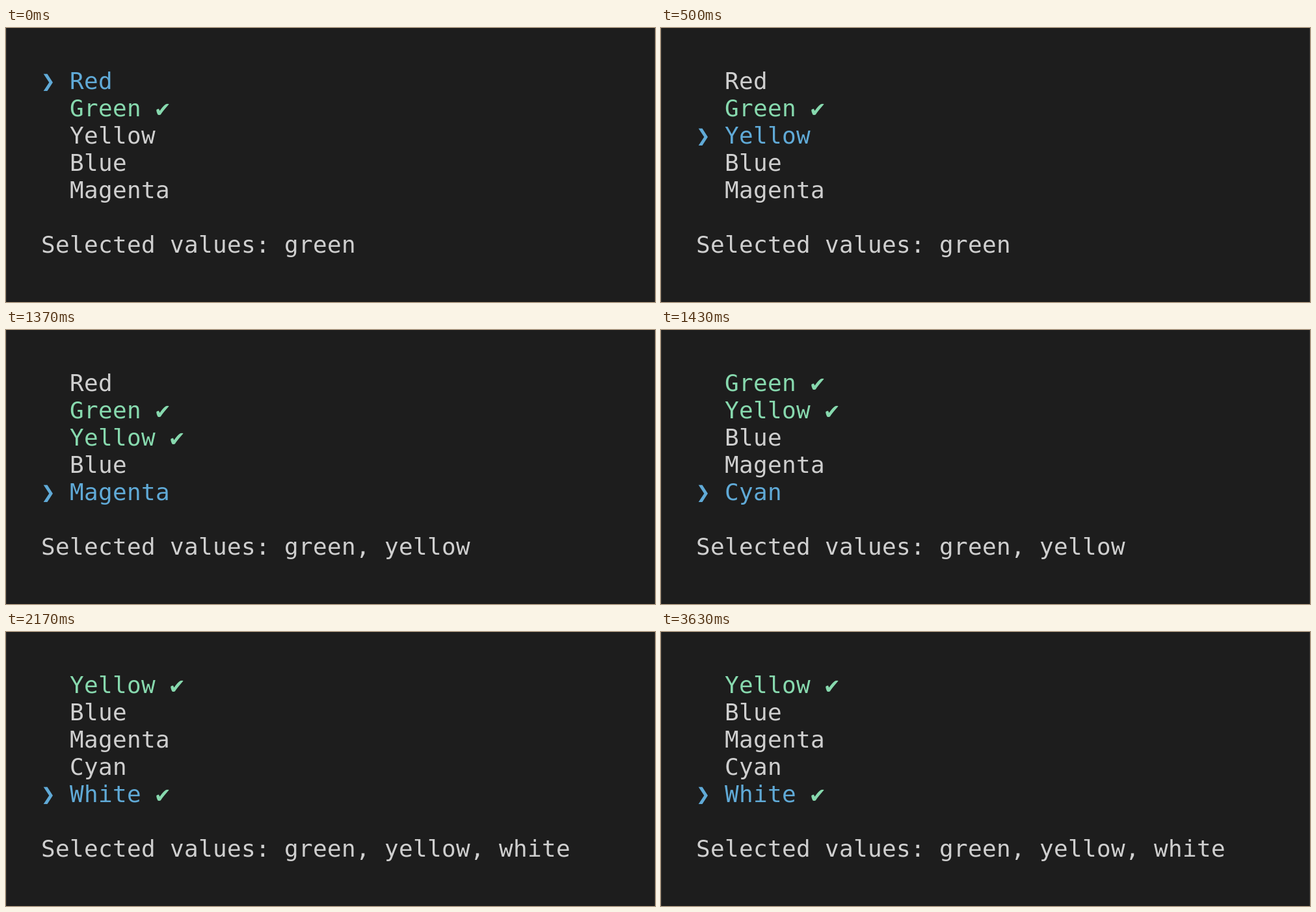
These frames come from a looping animation (998 by 422 pixels, 3.92 s). An HTML page:

```html
<!DOCTYPE html>
<html lang="en">
<head>
<meta charset="utf-8">
<title>Multi-select prompt</title>
<style>
  html, body { margin: 0; width: 100%; height: 100%; overflow: hidden; background: #1d1d1d; }
  svg { display: block; width: 998px; height: 422px; }
  text { font: 36px "DejaVu Sans Mono", monospace; white-space: pre; fill: #cfcfcf; }
  .focus { fill: #60aad7; }
  .picked { fill: #87d9ae; }
  .edge { fill: #303030; }
</style>
</head>
<body>
<svg viewBox="0 0 998 422">
  <rect class="edge" width="1" height="422"/>
  <rect class="edge" x="997" width="1" height="422"/>
  <g id="screen"></g>
</svg>
<script>
const LOOP = 3920;
const LEFT = 54, BASE = 94, CELL = 22, LINE = 42;
const VISIBLE = 5;
const colors = ["Red", "Green", "Yellow", "Blue", "Magenta", "Cyan", "White"];

// time in ms, focused item, number of picked items
const steps = [
  [0, 0, 1],
  [330, 1, 1],
  [500, 2, 1],
  [830, 2, 2],
  [1200, 3, 2],
  [1300, 4, 2],
  [1430, 5, 2],
  [1530, 6, 2],
  [2070, 6, 3]
];
const pickOrder = [1, 2, 6];
const screen = document.getElementById("screen");

// Puts text on the terminal's character grid.
function put(str, col, row, cls = "") {
  const el = document.createElementNS("http://www.w3.org/2000/svg", "text");
  const xs = Array.from(str, (_, i) => LEFT + (col + i) * CELL);
  el.setAttribute("x", xs.join(" "));
  el.setAttribute("y", BASE + row * LINE);
  el.setAttribute("class", cls);
  el.textContent = str;
  screen.append(el);
}

function draw([, focus, count]) {
  const picked = pickOrder.slice(0, count);
  const top = Math.max(0, focus - VISIBLE + 1);
  screen.replaceChildren();
  for (let row = 0; row < VISIBLE; row++) {
    const item = top + row;
    const name = colors[item];
    const isPicked = picked.includes(item);
    if (item === focus) put("❯", 0, row, "focus");
    put(name, 2, row, item === focus ? "focus" : isPicked ? "picked" : "");
    if (isPicked) put("✔", name.length + 3, row, "picked");
  }
  const values = picked.map(i => colors[i].toLowerCase()).join(", ");
  put("Selected values: " + values, 0, VISIBLE + 1);
}

const start = performance.now();
let shown = null;

function tick() {
  const t = (performance.now() - start) % LOOP;
  const step = steps.findLast(s => s[0] <= t);
  if (step !== shown) draw(shown = step);
  requestAnimationFrame(tick);
}
tick();
</script>
</body>
</html>
```
